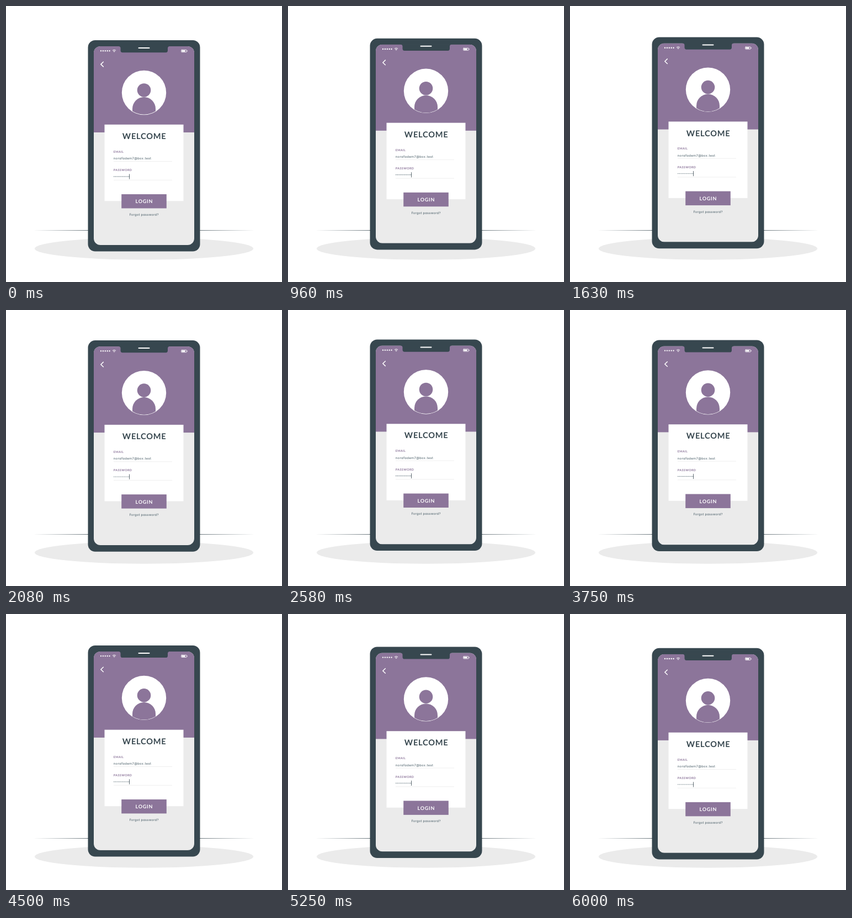
An HTML page for the animation above (6.04 s loop, 500x500 px).

```html
<!DOCTYPE html>
<html lang="en">
<head>
<meta charset="utf-8">
<title>Login screen</title>
<style>
  html, body { margin: 0; width: 100%; height: 100%; overflow: hidden; background: #fff; }
  svg { display: block; width: 100vw; height: 100vh; }
  text { font-family: Lato, sans-serif; font-weight: 700; text-rendering: geometricPrecision; }
  .mid { text-anchor: middle; }
  .label { font-size: 5.4px; fill: #8c759a; letter-spacing: .42px; }
  .small { font: 400 5.8px Inter, sans-serif; font-feature-settings: "cv11"; fill: #455a64; }
  .dark { fill: #37474f; }
  .purple { fill: #8c759a; }
  .pale { fill: #ebebeb; }
  .white { fill: #fff; }
  .stroke { fill: none; stroke: #fff; stroke-linecap: round; stroke-linejoin: round; }
  .rule { stroke: #dedede; stroke-width: .5; }
  .dots { fill: none; stroke-linecap: round; }
</style>
</head>
<body>
<svg viewBox="0 0 500 500">
  <defs>
    <clipPath id="screen"><rect x="159" y="73" width="182" height="360" rx="12"/></clipPath>
    <clipPath id="avatar"><circle cx="250" cy="157" r="39.6"/></clipPath>
  </defs>

  <ellipse class="pale" cx="250" cy="439.5" rx="198" ry="20.2"/>
  <path class="dark" d="M49 406.5 Q250 405.3 451 406.5 Q250 407.7 49 406.5Z"/>

  <g id="phone">
    <rect class="dark" x="148.5" y="62" width="203" height="382.6" rx="13"/>
    <g clip-path="url(#screen)">
      <rect class="pale" x="159" y="73" width="182" height="360"/>
      <rect class="purple" x="159" y="73" width="182" height="156"/>
    </g>
    <path class="dark" d="M204 72.5 V73 Q207.5 73 207.5 76.5 V80.5 Q207.5 84.2 211 84.2 H289.5 Q293 84.2 293 80.5 V76.5 Q293 73 296.5 73 V72.5Z"/>
    <path class="stroke" stroke-width="2" d="M240.5 76 H259.5"/>

    <path class="dots" stroke="#fff" stroke-width="2.4" stroke-dasharray="0 3.88" d="M172 81.2 H187.6"/>
    <path class="stroke" stroke-width=".9" d="M193.2 80.2 Q196 78 198.8 80.2 M194.6 81.7 Q196 80.7 197.4 81.7"/>
    <circle class="white" cx="196" cy="83" r=".7"/>
    <rect class="stroke" stroke-width=".8" x="317.6" y="79.4" width="9.6" height="4.2" rx=".8"/>
    <rect class="white" x="318.4" y="80.2" width="6.2" height="2.6"/>
    <rect class="white" x="327.5" y="80.5" width="1" height="2"/>
    <path class="stroke" stroke-width="1.5" d="M176.3 101.3 L171.8 105.6 L176.3 109.9"/>

    <circle class="white" cx="250" cy="157" r="40.2"/>
    <circle class="purple" cx="250" cy="152.5" r="12.3"/>
    <path class="purple" clip-path="url(#avatar)" d="M229 200 V186 A21 21 0 0 1 271 186 V200Z"/>

    <rect class="white" x="178.5" y="214.8" width="143" height="138.5"/>
    <text class="mid dark" x="250.6" y="241" font-size="14.6" letter-spacing=".75">WELCOME</text>

    <text class="label" x="194.8" y="265.8">EMAIL</text>
    <text class="small" x="194.8" y="278.2" letter-spacing=".4">norafadem7@box.test</text>
    <path class="rule" d="M195 281.6 H301"/>

    <text class="label" x="194.8" y="299.2">PASSWORD</text>
    <path class="dots" stroke="#455a64" stroke-width="1.4" stroke-dasharray="0 2.64" d="M195.8 309 H222.3"/>
    <rect class="dark" x="223" y="304.4" width=".8" height="9.2"/>
    <path class="rule" d="M195 315.4 H301"/>

    <rect class="purple" x="209.2" y="341" width="81.6" height="25.5"/>
    <text class="mid white" x="250.3" y="357.5" font-size="9" letter-spacing=".75">LOGIN</text>
    <text class="mid small" x="250" y="380" letter-spacing=".25">Forgot password?</text>
  </g>
</svg>
<script>
  const LOOP = 6040, RISE = 10;
  const phone = document.getElementById('phone');
  const start = performance.now();

  // Steady rise for half the loop, steady fall for the other half.
  function draw() {
    const p = (performance.now() - start) % LOOP / LOOP;
    const y = RISE * (Math.abs(2 * p - 1) - 1);
    phone.setAttribute('transform', `translate(0 ${y.toFixed(3)})`);
    requestAnimationFrame(draw);
  }
  draw();
</script>
</body>
</html>
```
